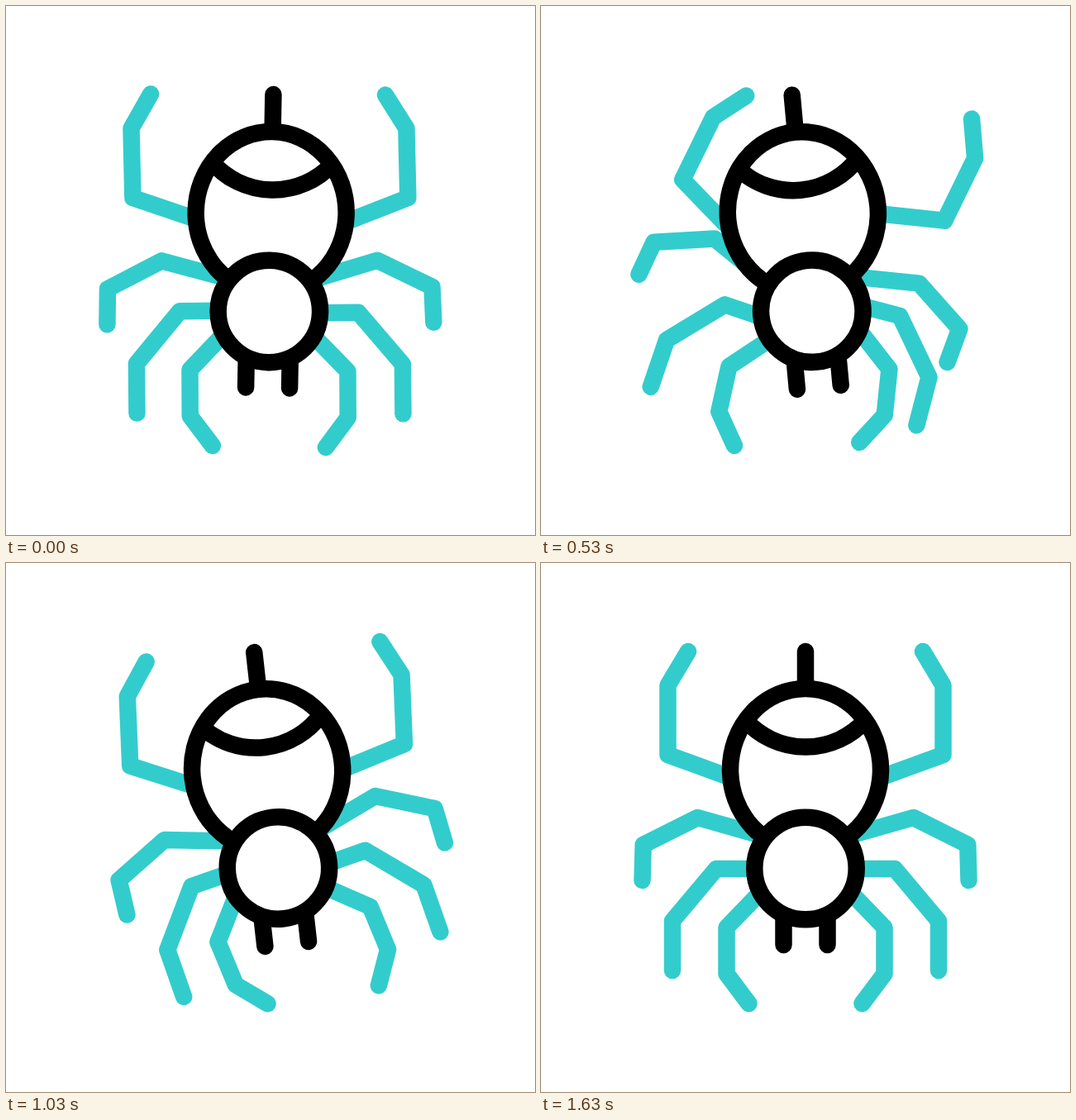
An HTML page that plays this animation: 640x640 px, repeating every 1670 ms.

```html
<!DOCTYPE html>
<html lang="en">
<head>
<meta charset="utf-8">
<title>Walking spider</title>
<style>
  html, body { margin: 0; width: 100%; height: 100%; overflow: hidden; background: #fff; }
  svg { display: block; width: 100%; height: 100%; }
</style>
</head>
<body>
<svg viewBox="0 0 640 640" fill="none" stroke-width="20.5" stroke-linecap="round" stroke-linejoin="round">
  <g id="spider">
    <g id="legs" stroke="#33cccc"></g>
    <g stroke="#000">
      <path d="M320 107V150M293.5 462V430M346.5 462V430"/>
      <ellipse cx="320" cy="250" rx="91" ry="98" fill="#fff"/>
      <path d="M247.5 190.5A98 98 0 0 0 392.5 190.5" stroke-linecap="butt"/>
      <circle cx="320" cy="369.5" r="61.7" fill="#fff"/>
    </g>
  </g>
</svg>
<script>
const LOOP = 1670, FRAMES = 50, FRAME_MS = 100 / 3;
const REST = [-1.3, 0];

// Left legs from tip to root; the right ones are mirrored.
const LEGS = [
  '178,107 153.5,148 153.5,232 229,259.5',
  '122.5,384 123.7,341 189.5,308 272,331.5',
  '159,493 159,433 212,370 256,370',
  '251.5,533 224.5,497 224.5,441 264,400'
].map(points => points.split(' ').map(p => p.split(',').map(Number)));

// Each pose is [frame, angle]; leg angles are relative to the body.
const bodyPoses = [REST, [9, 25.2], [20.7, -22], [36.7, 0]];

// Legs further down swing later; on the right the second swing trails more.
function legPoses(row, isRight) {
  const late = Math.sqrt(row);
  return [
    REST,
    [6.7 + 0.93 * row, -34],
    [16.6 + (isRight ? 1.1 : 0.73) * row, 32],
    [26.1 + 1.3 * late, -26],
    [35 + 1.65 * late, 26.2],
    [45.6 + row, 0]
  ];
}

const legGroup = document.getElementById('legs');

function addLeg(points, poses) {
  const node = document.createElementNS('http://www.w3.org/2000/svg', 'polyline');
  node.setAttribute('points', points.join(' '));
  legGroup.append(node);
  return { node, pivot: points.at(-1), poses };
}

const mirror = points => points.map(([x, y]) => [640 - x, y]);
const parts = [
  { node: document.getElementById('spider'), pivot: [320, 284.5], poses: bodyPoses },
  ...LEGS.flatMap((points, row) => [
    addLeg(points, legPoses(row, false)),
    addLeg(mirror(points), legPoses(row, true))
  ])
];

const smooth = u => u * u * (3 - 2 * u);

function angleAt(frame, poses) {
  const next = poses.findIndex(([time]) => time > frame);
  if (next < 0) return poses.at(-1)[1];
  const [t0, a0] = poses[next - 1];
  const [t1, a1] = poses[next];
  return a0 + (a1 - a0) * smooth((frame - t0) / (t1 - t0));
}

function render(ms) {
  // The small lead absorbs frame times rounded to 10 ms.
  const frame = Math.min(FRAMES - 1, Math.floor((ms % LOOP + 3.4) / FRAME_MS));
  for (const { node, pivot, poses } of parts) {
    node.setAttribute('transform', `rotate(${angleAt(frame, poses)} ${pivot})`);
  }
}

const start = performance.now();
function tick() {
  render(performance.now() - start);
  requestAnimationFrame(tick);
}
tick();
</script>
</body>
</html>
```
